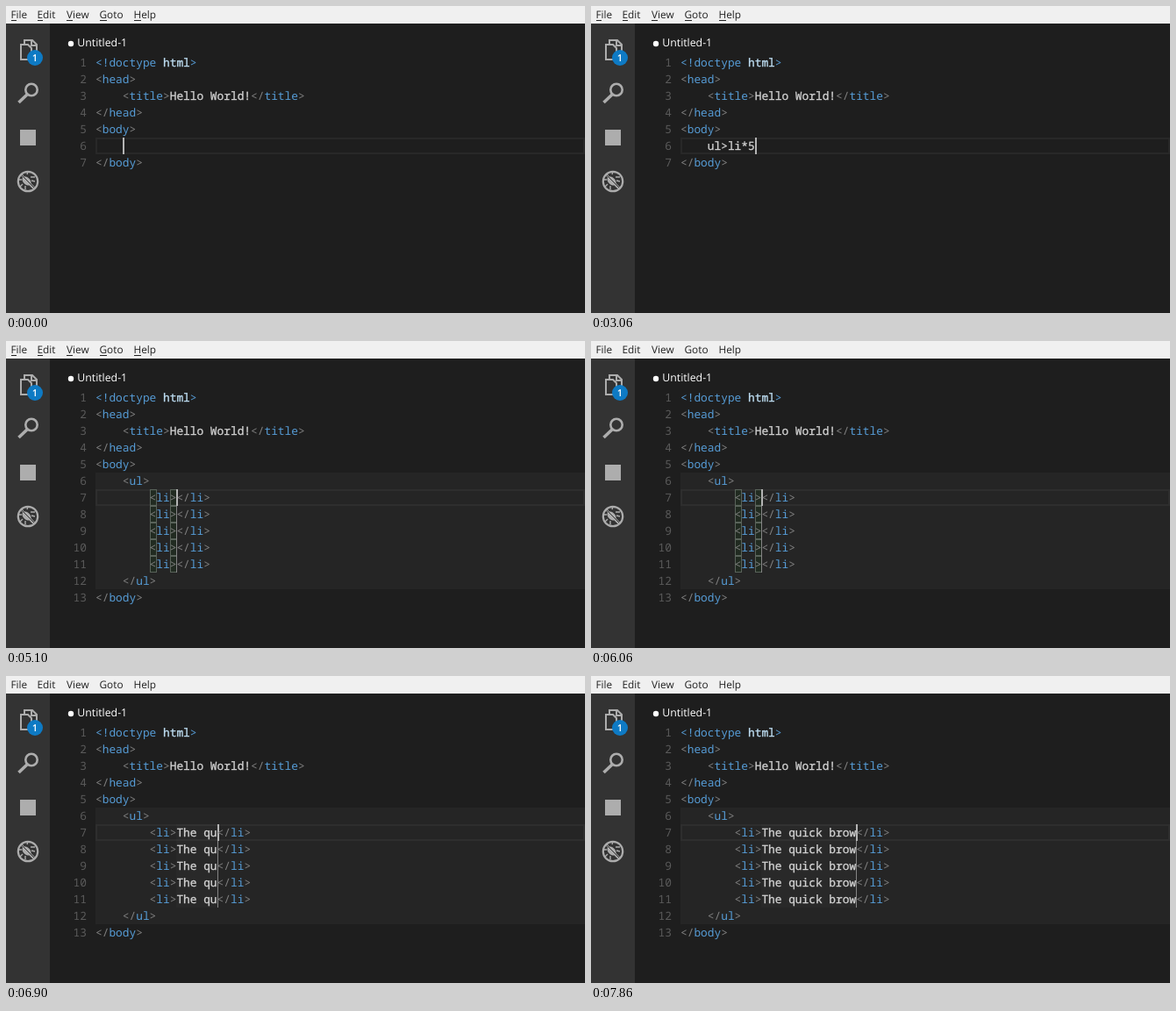
An HTML page for the animation above (8 s loop, 660 by 350 pixels).

```html
<!DOCTYPE html>
<html lang="en">
<head>
<meta charset="utf-8">
<title>Editor abbreviation demo</title>
<style>
  html, body { margin: 0; width: 100%; height: 100%; overflow: hidden; background: #1e1e1e; }
  #stage { position: relative; width: 660px; height: 350px; overflow: hidden; background: #1e1e1e; }
  #stage > *, #marks > * { position: absolute; box-sizing: border-box; }
  #chrome { left: 0; top: 0; font-family: "Open Sans", "Noto Sans", sans-serif; text-rendering: geometricPrecision; }
  pre { margin: 0; top: 55px; font: 12.83px/19px "Noto Sans Mono", "DejaVu Sans Mono", monospace;
        text-rendering: geometricPrecision; font-variant-ligatures: none; }
  #numbers { left: 60px; width: 32px; text-align: right; color: #5a5a5a; }
  #code { left: 102px; color: #d4d4d4; }
  #code b { font-weight: 400; -webkit-text-stroke: .3px; }
  #code i { font-style: normal; color: #808080; }
  #code u { text-decoration: none; color: #569cd6; }
  #code .attr { color: #c0e0f5; }
  #marks { left: 0; top: 0; }
  .line { border: 2px solid #282828; }
  .snippet { background: rgba(124, 124, 124, .075); }
  .field { background: rgba(124, 124, 124, .05); }
  .bracket { border: 1px solid #59635a; background: rgba(0, 100, 0, .1); }
  .main { background: #b4b4b4; }
  .extra { background: #858585; }
</style>
</head>
<body>
<div id="stage">
  <svg id="chrome" width="660" height="350">
    <rect width="660" height="20" fill="#f0f0f0"/>
    <rect y="20" width="50" height="330" fill="#333"/>
    <g font-size="11.8" fill="#222">
      <text x="5.5" y="14">File</text>
      <text x="35.5" y="14">Edit</text>
      <text x="69" y="14">View</text>
      <text x="106.5" y="14">Goto</text>
      <text x="145.5" y="14">Help</text>
    </g>
    <path id="mnemonics" d="M6 16.5h6M36 16.5h6M69 16.5h7M107 16.5h8M146 16.5h8" stroke="#222"/>
    <g fill="none" stroke="#adadad" stroke-width="2">
      <path d="M21 43v-4h9l5 5v11h-5M29 39v6h6"/>
      <path d="M17 44h8l4 4v13h-12z" fill="#333"/>
      <circle cx="29" cy="95.5" r="6.7" stroke-width="2.6"/>
      <path d="M24 101l-9.5 9" stroke-width="3.6"/>
      <circle cx="25" cy="200" r="11.2" stroke-width="2.2"/>
      <path d="M19 194l-1-3M24 192l1-3M28 195h5M29 199l4 1M27 204l4 4M22 205v4M19 203l-3 3M18 198h-4" stroke-width="1.4"/>
      <path d="M17 192l16 16" stroke-width="2"/>
    </g>
    <ellipse cx="23.5" cy="199.5" rx="4" ry="6" transform="rotate(-45 23.5 199.5)" fill="#adadad"/>
    <path d="M18 193l14 14" stroke="#333"/>
    <rect x="16" y="141" width="18" height="18" fill="#adadad"/>
    <circle cx="33" cy="59" r="9" fill="#0e7ac4"/>
    <text x="33" y="63" font-size="11" font-weight="600" text-anchor="middle" fill="#fff">1</text>
    <circle cx="74" cy="43" r="3.2" fill="#fff"/>
    <text x="81.3" y="46" font-size="12.3" fill="#fff">Untitled-1</text>
  </svg>
  <div id="marks"></div>
  <pre id="numbers"></pre>
  <pre id="code"></pre>
</div>
<script>
const LOOP = 8000, EXPAND = 3300, MENU_PLAIN = 5520;
const LEFT = 102, TOP = 55, CHAR = 7.7, ROW = 19;
const ABBR = 'ul>li*5', WORDS = 'The quick brow';
const abbrKeys = [960, 1080, 1380, 1680, 1920, 2640, 3060];
const wordKeys = [6360, 6540, 6600, 6720, 6780, 6900, 7080, 7200, 7260, 7380, 7560, 7620, 7800, 7860];
const addCursors = [4680, 4860, 4980, 5100];
const caretOff = [[60, 540], [2340, 2640], [3780, 4260], [5580, 6060]];

const el = id => document.getElementById(id);
const passed = (times, t) => times.filter(x => x <= t).length;
const colX = col => Math.round(LEFT + col * CHAR);
const rowY = row => TOP + (row - 1) * ROW;
const box = (kind, x, row, w, rows = 1) =>
  `<div class="${kind}" style="left:${x}px;top:${rowY(row)}px;width:${w}px;height:${rows * ROW}px"></div>`;

const DOCTYPE = '<u>&lt;!doctype</u> <b class="attr">html</b><u>&gt;</u>';
const escape = s => s.replace(/</g, '&lt;').replace(/>/g, '&gt;');
const colour = line => line.replace(/(<\/?)(\w+)>|[^<]+/g, (text, open, tag) =>
  tag ? `<i>${escape(open)}</i><u>${tag}</u><i>&gt;</i>` : `<b>${escape(text)}</b>`);

function codeLines(expanded, typed) {
  const indent = ' '.repeat(4);
  const item = `${indent}${indent}<li>${typed}</li>`;
  const body = expanded
    ? [indent + '<ul>', ...Array(5).fill(item), indent + '</ul>']
    : [indent + typed];
  return ['<head>', indent + '<title>Hello World!</title>', '</head>', '<body>', ...body, '</body>'];
}

function markBoxes(expanded, count, cursors, caret) {
  const row = expanded ? 7 : 6;
  const x = colX((expanded ? 12 : 4) + count);
  let out = box('line', LEFT, row, 660 - LEFT);
  if (expanded) out += box('snippet', LEFT, 6, 660 - LEFT, 7);
  if (expanded && count) out += box('field', colX(12), 7, x - colX(12), 5);
  for (let i = 0; i < cursors; i++) {
    if (cursors > 1 && !count)
      out += box('bracket', colX(8), row + i, 8) + box('bracket', colX(11), row + i, 8);
    if (caret) out += box(i ? 'extra' : 'main', x, row + i, i ? 1 : 2);
  }
  return out;
}

let shown = '';
function render(t) {
  const expanded = t >= EXPAND;
  const count = passed(expanded ? wordKeys : abbrKeys, t);
  const cursors = 1 + passed(addCursors, t);
  const caret = !caretOff.some(([from, to]) => t >= from && t < to);
  const plain = t >= MENU_PLAIN;
  const state = [expanded, count, cursors, caret, plain].join();
  if (state === shown) return;
  shown = state;
  const lines = codeLines(expanded, (expanded ? WORDS : ABBR).slice(0, count));
  el('code').innerHTML = [DOCTYPE, ...lines.map(colour)].join('\n');
  el('numbers').textContent = Array.from({ length: lines.length + 1 }, (_, i) => i + 1).join('\n');
  el('marks').innerHTML = markBoxes(expanded, count, cursors, caret);
  el('mnemonics').style.display = plain ? 'none' : '';
}

const start = performance.now();
function tick() {
  render((performance.now() - start) % LOOP);
  requestAnimationFrame(tick);
}
tick();
</script>
</body>
</html>
```
